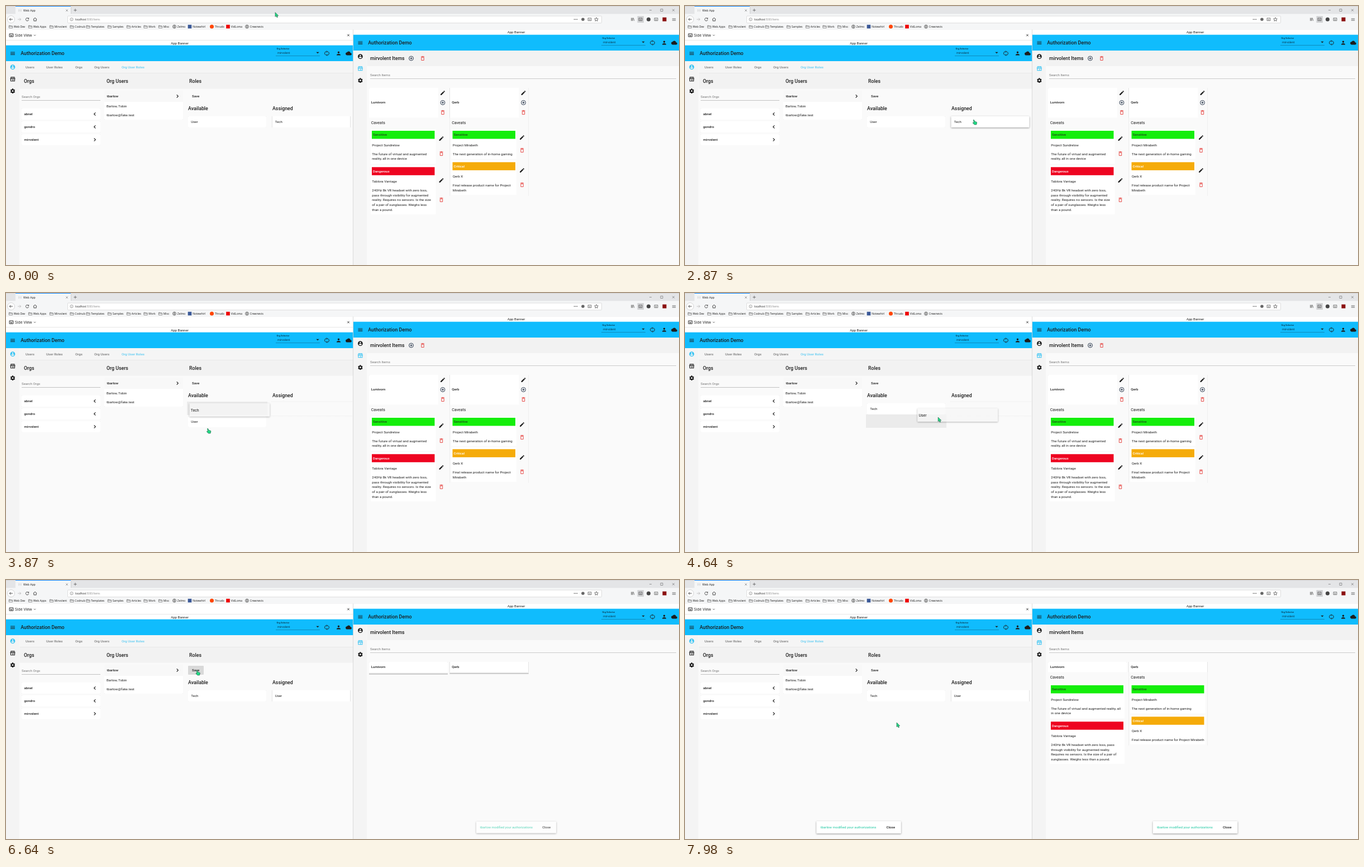
Write an HTML page that moves like this. It is 1205x465 px and loops after 8 s.

```html
<!DOCTYPE html>
<html lang="en">
<head>
<meta charset="utf-8">
<title>Authorization Demo</title>
<style>
html, body { margin: 0; width: 100%; height: 100%; overflow: hidden; background: #fafafa; }
svg { display: block; font-family: Roboto, sans-serif; }
text { white-space: pre; }
.ui { font-family: "Open Sans", "Noto Sans", sans-serif; }
.card { filter: drop-shadow(0 .8px .5px #0006); }
.raised { filter: drop-shadow(0 1.4px 1.5px #0006); }
</style>
</head>
<body>
<svg id="stage" width="1205" height="465" viewBox="0 0 1205 465"><g id="base"></g><g id="live"></g></svg>
<script>
const LOOP = 8000, BLUE = '#10bcfd', CYAN = '#35c3f3', INK = '#1c1c1c', RED = '#e53935', GREEN = '#14ee0b';
const USER = 'tbarlow', ORG = 'mirvolent';

// 24-unit icons: filled shapes and stroked ones
const FILL = {
  menu: 'M3 18h18v-2H3zM3 13h18v-2H3zM3 6v2h18V6z',
  person: 'M12 12a4 4 0 100-8 4 4 0 000 8zm0 2c-2.7 0-8 1.3-8 4v2h16v-2c0-2.7-5.3-4-8-4z',
  cloud: 'M19.4 10A7.5 7.5 0 005.3 8 6 6 0 006 20h13a5 5 0 00.4-10z',
  account: 'M12 2a10 10 0 100 20 10 10 0 000-20zm0 3a3 3 0 110 6 3 3 0 010-6zm0 14.2a7 7 0 01-6-3.2c0-2 4-3.1 6-3.1s6 1.1 6 3.1a7 7 0 01-6 3.2z',
  edit: 'M3 17.2V21h3.8L17.8 9.9l-3.7-3.7zM20.7 7a1 1 0 000-1.4l-2.3-2.3a1 1 0 00-1.4 0l-1.9 1.8 3.8 3.8z',
  caret: 'M6 9h12l-6 6z'
};
const LINE = {
  sync: 'M8 18.5A7 7 0 0112 5h2M16 5.5A7 7 0 0112 19h-2M11 1.5L14.5 5 11 8.5M13 15.5L9.5 19l3.5 3.5',
  trash: 'M7 8h10v12H7zM5 5h14M9 4h6',
  plus: 'M12 7v10M7 12h10M12 3a9 9 0 100 18 9 9 0 000-18z',
  store: 'M4 12v8h16v-8M3 11l2-7h14l2 7zM9 4v7M15 4v7M13 13v7',
  gear: 'M12 6.5a5.5 5.5 0 100 11 5.5 5.5 0 000-11zM12 2v4M12 18v4M3.5 7l3.3 2M17.2 15l3.3 2M3.5 17l3.3-2M17.2 9l3.3-2',
  left: 'M15 6l-6 6 6 6', right: 'M9 6l6 6-6 6', down: 'M6 9l6 6 6-6',
  cross: 'M5 5l14 14M19 5L5 19', add: 'M12 4v16M4 12h16', dash: 'M4 12h16', box: 'M4 4h16v16H4z',
  back: 'M21 12H4M11 5l-7 7 7 7', forward: 'M3 12h17M13 5l7 7-7 7',
  reload: 'M19 8a8 8 0 101 6M20 3v6h-6', home: 'M3 12l9-8 9 8M6 11v9h12v-9',
  info: 'M12 11v6M12 7v1M12 3a9 9 0 100 18 9 9 0 000-18z',
  star: 'M12 3l2.7 6 6.3.6-4.8 4.3 1.5 6.5-5.7-3.5-5.7 3.5 1.5-6.5L3 9.6 9.3 9z',
  panel: 'M3 5h18v14H3zM7 11h4M14 11h3M8 15h8', books: 'M5 4v16M9 4v16M13 4v16M16 4l5 16',
  folder: 'M2 6h8l2 3h10v11H2zM2 10h20',
  globe: 'M12 2a10 10 0 100 20 10 10 0 000-20zM2 12h20M12 2v20M5 6h14M5 18h14',
  braces: 'M6 3H3v18h3M18 3h3v18h-3M12 9v6'
};

const rect = (x, y, w, h, fill, more = '') => `<rect x="${x}" y="${y}" width="${w}" height="${h}" fill="${fill}" ${more}/>`;
const card = (x, y, w, h, fill = '#fff', cls = 'card') => rect(x, y, w, h, fill, `rx=".8" class="${cls}"`);
const text = (x, y, s, size = 6.15, weight = 400, fill = INK) =>
  `<text x="${x}" y="${y + size * .35}" font-size="${size}" font-weight="${weight}" fill="${fill}">${s}</text>`;
const head = (x, y, s) => text(x, y, s, 8.79, 500);
const bold = (x, y, s, fill) => text(x, y, s, 6.15, 500, fill);
const mid = (x, y, s) => `<g text-anchor="middle">${text(x, y, s)}</g>`;
const dot = (x, y, r, fill) => `<circle cx="${x}" cy="${y}" r="${r}" fill="${fill}"/>`;
function icon(name, x, y, color = INK, size = 10.5, width = 2) {
  const paint = FILL[name] ? `fill="${color}"` : `fill="none" stroke="${color}" stroke-width="${width}"`;
  return `<path d="${FILL[name] || LINE[name]}" ${paint} transform="translate(${x - size / 2} ${y - size / 2}) scale(${size / 24})"/>`;
}

function browser() {
  const grey = '#444';
  let s = rect(0, 0, 1205, 14.5, '#e4e5e7') + rect(0, 14.5, 1205, 28, '#f5f6f7')
    + rect(0, 0, 1205, .5, '#c4c4c6')
    + rect(17, 0, 99, 15, '#f5f6f7') + rect(17, 0, 99, 1, '#0a84ff') + rect(116, 2, .5, 12, '#bbb')
    + icon('braces', 25, 8, '#999', 5) + text(31, 8, 'Web App', 5.2)
    + icon('cross', 109, 8, grey, 6) + icon('add', 124, 7.5, grey, 8)
    + icon('dash', 1154, 7.5, grey, 6) + icon('box', 1174, 7.5, grey, 6) + icon('cross', 1195, 7.5, grey, 6.5);
  s += '<circle cx="9" cy="24" r="6.5" fill="#fff" stroke="#bbb" stroke-width=".6"/>'
    + icon('back', 9, 24, '#333', 8, 2.5) + icon('forward', 24, 24, '#aaa', 8)
    + icon('reload', 38, 24, '#333', 8, 2.5) + icon('home', 52, 24, '#333', 8.5, 2.5)
    + rect(110.5, 18, 956, 12.5, '#fff', 'stroke="#ccc" stroke-width=".6" rx="1"')
    + icon('info', 117.5, 24, '#666', 7)
    + text(124, 24, 'localhost<tspan fill="#888">:5000/items</tspan>', 4.6);
  for (const x of [1017.5, 1020, 1022.5]) s += dot(x, 24, .8, grey);
  s += dot(1033, 24, 2.8, '#666') + icon('panel', 1045, 24, grey, 8) + icon('star', 1057, 24, grey, 9)
    + icon('books', 1122, 24, grey, 8) + rect(1130.5, 18, 11.5, 12, '#d2d3d5') + icon('panel', 1136, 24, grey, 8)
    + dot(1150.5, 24, 3.5, '#444') + icon('panel', 1164, 24, grey, 8)
    + rect(1175.5, 20.5, 7, 7, '#8b1010') + icon('menu', 1196, 24, grey, 8.5);
  const marks = [[8.5, 'Web Dev'], [43.5, 'Web Apps'], [81.5, 'Mirvolent'], [118, 'Codnub'], [147, 'Templates'],
    [185.5, 'Samples'], [219.5, 'Articles'], [250, 'Work'], [276.5, 'Misc'], [301.5, 'Zelmo', 'globe'],
    [329, 'Notewhirl', '#3b5998'], [368.5, 'Thrudo', '#ff4500'], [397.5, 'VidLoma', '#e00'], [431.5, 'Crewnests', 'globe']];
  for (const [x, name, kind = 'folder'] of marks) {
    s += kind == '#ff4500' ? dot(x, 37, 3.5, kind)
      : kind[0] == '#' ? rect(x - 3.3, 33.7, 6.6, 6.6, kind)
      : icon(kind, x, 37, '#555', 7.5);
    s += text(x + 5.3, 37, name, 5);
  }
  s += rect(0, 42, 1205, .5, '#dedede') + rect(0, 42.5, 621.5, 28.5, '#fff')
    + icon('panel', 9.5, 52.5, '#222', 9, 2.5) + text(16, 52.5, 'Side View', 6.9)
    + icon('down', 51.5, 52.5, '#222', 6, 3) + icon('cross', 613, 52.5, '#222', 6, 3.5)
    + rect(0, 61.5, 621.5, .5, '#ccc');
  return `<g class="ui">${s}</g>`;
}

// Blue bar with side rail, shared by both panes
function shell(x, y, w, active) {
  const mx = x + (x ? 12.4 : 12), right = x ? 1157.5 : 574.5, cy = y + 14;
  const sel = x ? 1066 : 483;
  let s = rect(x, y + 28, w, 465, '#fafafa') + rect(x, y + 28, 24, 465, '#f4f4f4')
    + rect(x, y - .4, w, 28.4, BLUE) + icon('menu', mx, cy) + head(x + 26.3, cy, 'Authorization Demo')
    + text(sel + 1.5, y + 5.3, 'Org Selector', 4.1, 500, '#0b2c3c')
    + text(sel + 3, cy - 1, ORG, 5.4, 400, '#0b3a50') + icon('caret', sel + 75, cy - 1)
    + rect(sel, y + 18.5, 79, .5, '#0b5a7c')
    + icon('sync', right, cy) + icon('person', right + 21, cy) + icon('cloud', right + 39, cy);
  ['account', 'store', 'gear'].forEach((n, i) =>
    s += icon(n, mx, y + 38.7 + i * 21.5, i == active ? CYAN : INK, 10.5, n == 'gear' ? 4.5 : 2.4));
  return s;
}

function leftPane() {
  let s = mid(311, 66.5, 'App Banner') + shell(0, 71, 621.5, 0)
    + rect(24.5, 99, 597, 22, '#f5f5f5') + rect(24.5, 121, 597, 27.5, '#f2f2f2') + rect(24.5, 120.5, 597, .5, '#ddd');
  [[35, 'Users'], [72, 'User Roles'], [124, 'Orgs'], [158, 'Org Users'], [207, 'Org User Roles']].forEach(([x, n], i) =>
    s += bold(x, 110, n, i == 4 ? '#5ccbf2' : '#777'));
  s += head(32, 135, 'Orgs') + head(180, 135, 'Org Users') + head(328, 135, 'Roles')
    + text(28, 163, 'Search Orgs', 6.15, 400, '#777') + rect(28, 169, 141, .5, '#888');
  ['abnel', 'gondro', ORG].forEach((n, i) => {
    const y = 184 + i * 23;
    s += card(28, y, 141, 20) + bold(32.5, y + 10, n) + icon(i < 2 ? 'left' : 'right', 159, y + 10, INK, 10.5, 2.5);
  });
  s += card(176, 152, 141, 52) + rect(176, 152, 141, 20, '#f8f8f8') + bold(180.5, 162, USER)
    + icon('right', 307, 162, INK, 10.5, 2.5) + text(180, 180, 'Barlow, Tobin') + text(180, 196, USER + '@fake.test')
    + head(326, 184, 'Available') + head(477, 184, 'Assigned');
  return s;
}

function rightPane() {
  return rect(622, 42.5, 583, 10, '#fff') + mid(913.5, 47, 'App Banner') + shell(622, 52, 583, 1)
    + rect(646.5, 80, 559, 28, '#f2f2f2') + head(652, 94, ORG + ' Items')
    + text(652, 124, 'Search Items', 6.15, 400, '#777') + rect(652, 130, 548, .5, '#999')
    + rect(621.3, 42.5, .7, 423, '#ccc');
}

const clamp = v => Math.max(0, Math.min(1, v));
const smooth = p => p * p * (3 - 2 * p);
const mix = (a, b, p) => a + (b - a) * p;
// Deceleration curve cubic-bezier(0, 0, .2, 1)
function decel(p) {
  let lo = 0, hi = 1;
  for (let i = 0; i < 20; i++) {
    const m = (lo + hi) / 2;
    if (.6 * m * m * (1 - m) + m ** 3 < p) lo = m; else hi = m;
  }
  return 3 * lo * lo - 2 * lo ** 3;
}

// time, x, y, eased
const PATH = [[0, 482, 11.5], [1740, 482, 11.5], [1770, 482, 12.5], [1910, 482, 12.5], [2570, 517.5, 204, 1],
  [2870, 517.5, 204], [3300, 440, 212], [3670, 385, 215], [3770, 385, 215], [3870, 361.5, 243],
  [4050, 361, 243], [4150, 361, 234], [4250, 361, 234], [4640, 453, 223], [5050, 528, 218], [5270, 525, 225],
  [5380, 460.5, 200], [5950, 342, 162, 1], [7510, 342, 162], [7980, 379, 256, 1], [8000, 379, 256]];
function pointer(t) {
  const i = Math.max(1, PATH.findIndex(k => k[0] > t)), a = PATH[i - 1], b = PATH[i];
  const q = (t - a[0]) / (b[0] - a[0]), p = b[3] ? smooth(q) : q;
  return [mix(a[1], b[1], p), mix(a[2], b[2], p)];
}

function cursor(t) {
  const [x, y] = pointer(t), over = (a, b) => t >= a && t < b;
  const hand = over(2545, 2900) || over(3790, 4260) || over(5290, 5450) || over(5880, 7600);
  const d = hand
    ? 'M-1 .5Q.2 0 .7 1.2L1.3 3.2 4.7 4.2Q5.7 4.6 5.3 6L4.5 9H.9L-2 6.2Q-2.3 5-1 5.2L0 5.8z'
    : 'M0 0V7.8L1.8 6.2 3 9 4.5 8.4 3.3 5.7H5.7z';
  return `<path d="${d}" transform="translate(${x} ${y})" fill="#1fdc86" stroke="#12382a" stroke-width=".5"/>`;
}

const SLOT = [[324, 195], [324, 218], [474.5, 195]];
const roleCard = (slot, name, cls) => {
  const [x, y] = SLOT[slot];
  return card(x + 2, y + 3, 140, 20, '#fff', cls) + text(x + 7.2, y + 13, name);
};
// A dragged role follows the pointer, then settles into its slot
function drag(t, name, from, to, start, drop) {
  const off = pointer(start).map((v, i) => v - SLOT[from][i]);
  const p = decel(clamp((t - drop) / 250));
  const [x, y] = pointer(Math.min(t, drop)).map((v, i) => mix(v - off[i], SLOT[to][i], p));
  return `<g opacity=".7">${card(x, y, 144, 24, '#f7f7f7', 'raised')}</g>` + text(x + 2.3, y + 13, name, 6.9);
}
function roles(t) {
  const hole = i => rect(...SLOT[i], 144, 24, '#ebebeb');
  const ripple = clamp((t - 6380) / 80) * clamp((7000 - t) / 250);
  let s = '';
  if (t > 5880 && t < 7600) s += rect(326, 154, 28, 16, '#000', 'rx="1" opacity=".025"');
  if (ripple) s += rect(326, 154, 28, 16, '#000', `rx="1" opacity="${.11 * ripple}"`);
  s += bold(333, 162, 'Save');
  if (t > 3180 && t < 4757)
    s += '<path d="M475 195H621M475 220.8H621" stroke="#ddd" stroke-width=".6" stroke-dasharray="1 1"/>';
  if (t < 2900) s += roleCard(0, 'User') + roleCard(2, 'Tech', t > 2560 ? 'raised' : 'card');
  else if (t < 4020) {
    const moved = t > 3180;
    s += hole(moved ? 0 : 2) + roleCard(moved ? 1 : 0, 'User') + drag(t, 'Tech', 2, 0, 2870, 3770);
  } else {
    s += roleCard(0, 'Tech');
    if (t < 4255) s += roleCard(1, 'User');
    else if (t < 5520) s += hole(t < 4757 ? 1 : 2) + drag(t, 'User', 1, 2, 4250, 5270);
    else s += roleCard(2, 'User');
  }
  return `<svg width="621.5" height="465">${s}</svg>`;
}

const ITEMS = [
  { x: 650, name: 'Lumivorn', end: 376, slimEnd: 332, icons: [238, 265, 313, 348], notes: [
    [224, 'Sensitive', GREEN, 'Project Sundrelow', ['The future of virtual and augmented', 'reality, all in one device'],
      ['The future of virtual and augmented reality, all', 'in one device']],
    [289.3, 'Dangerous', '#ee0420', 'Tablora Vantage',
      ['240Hz 8k VR headset with zero loss,', 'pass through visibility for augmented', 'reality. Requires no sensors. Is the size', 'of a pair of sunglasses. Weighs less', 'than a pound.'],
      ['240Hz 8k VR headset with zero loss, pass', 'through visibility for augmented reality.', 'Requires no sensors. Is the size of a pair of', 'sunglasses. Weighs less than a pound.']]] },
  { x: 794.5, name: 'Qerb', end: 341, slimEnd: 297, icons: [236, 259, 295, 321], notes: [
    [224, 'Sensitive', GREEN, 'Project Mirabeth', ['The next generation of in-home gaming'], ['The next generation of in-home gaming']],
    [280.4, 'Critical', '#f5ab0a', 'Qerb X', ['Final release product name for Project', 'Mirabeth'],
      ['Final release product name for Project Mirabeth']]] }
];
function item({ x, name, end, slimEnd, icons, notes }, slim, open) {
  const dy = slim ? -35 : 0, top = 200.5 + dy, full = slim ? slimEnd : end;
  const bottom = mix(top, full, open), wide = slim ? 130 : 112.5;
  let s = rect(x, top, 141, full - top, '#fafafa') + text(x + 3.7, 209.3 + dy, 'Caveats', 7.03);
  notes.forEach(([y, level, color, title, lines, slimLines], i) => {
    y += dy;
    const next = i ? full - 2 : notes[1][0] + dy - 6;
    s += rect(x + 3, y - 3, wide + 4, next - y + 3, '#fff') + rect(x + 5, y, wide, 14.5, color)
      + bold(x + 7, y + 7.2, level, color == GREEN ? '#1d4a1b' : '#fff') + text(x + 5.3, y + 25.6, title);
    (slim ? slimLines : lines).forEach((l, n) => s += text(x + 5.3, y + 41.4 + n * 8.8, l));
  });
  if (!slim) icons.forEach((y, i) => s += icon(i % 2 ? 'trash' : 'edit', x + 129.5, y, i % 2 ? RED : INK));
  s = card(x, 147, 141, bottom - 147) + `<svg width="1205" height="${bottom}">${s}</svg>`
    + (slim && open < .3 ? rect(x, bottom - 2, 141, 2, '#0003') : '')
    + bold(x + 3.7, slim ? 155.7 : 173.3, name);
  if (!slim) s += rect(x + 124, 147, 17, 53.5, '#fafafa') + icon('edit', x + 132, 156)
    + icon('plus', x + 132, 173.5, '#13233a') + icon('trash', x + 132, 191, RED);
  return s;
}

function snack(t, cx, start) {
  if (t < start) return '';
  const p = decel(clamp((t - start) / 150)), k = .8 + .2 * p;
  return `<g opacity="${p}" transform="translate(${cx} 444) scale(${k})">`
    + card(-75.7, -11, 151.5, 22, '#fff', 'raised')
    + text(-68.5, 0, USER + ' modified your authorizations', 6.15, 400, '#1cc7a0') + bold(49.5, 0, 'Close') + '</g>';
}

function draw(t) {
  const slim = t >= 6560, open = slim ? smooth(clamp((t - 6620) / 225)) : 1;
  return roles(t) + (slim ? '' : icon('plus', 725.5, 94, '#13233a') + icon('trash', 746, 94, RED))
    + ITEMS.map(i => item(i, slim, open)).join('')
    + snack(t, 913.5, 6585) + snack(t, 311, 6700) + cursor(t);
}

const $ = id => document.getElementById(id);
$('base').innerHTML = browser() + leftPane() + rightPane();
const begin = performance.now();
function tick() {
  $('live').innerHTML = draw((performance.now() - begin) % LOOP);
  requestAnimationFrame(tick);
}
tick();
</script>
</body>
</html>
```
